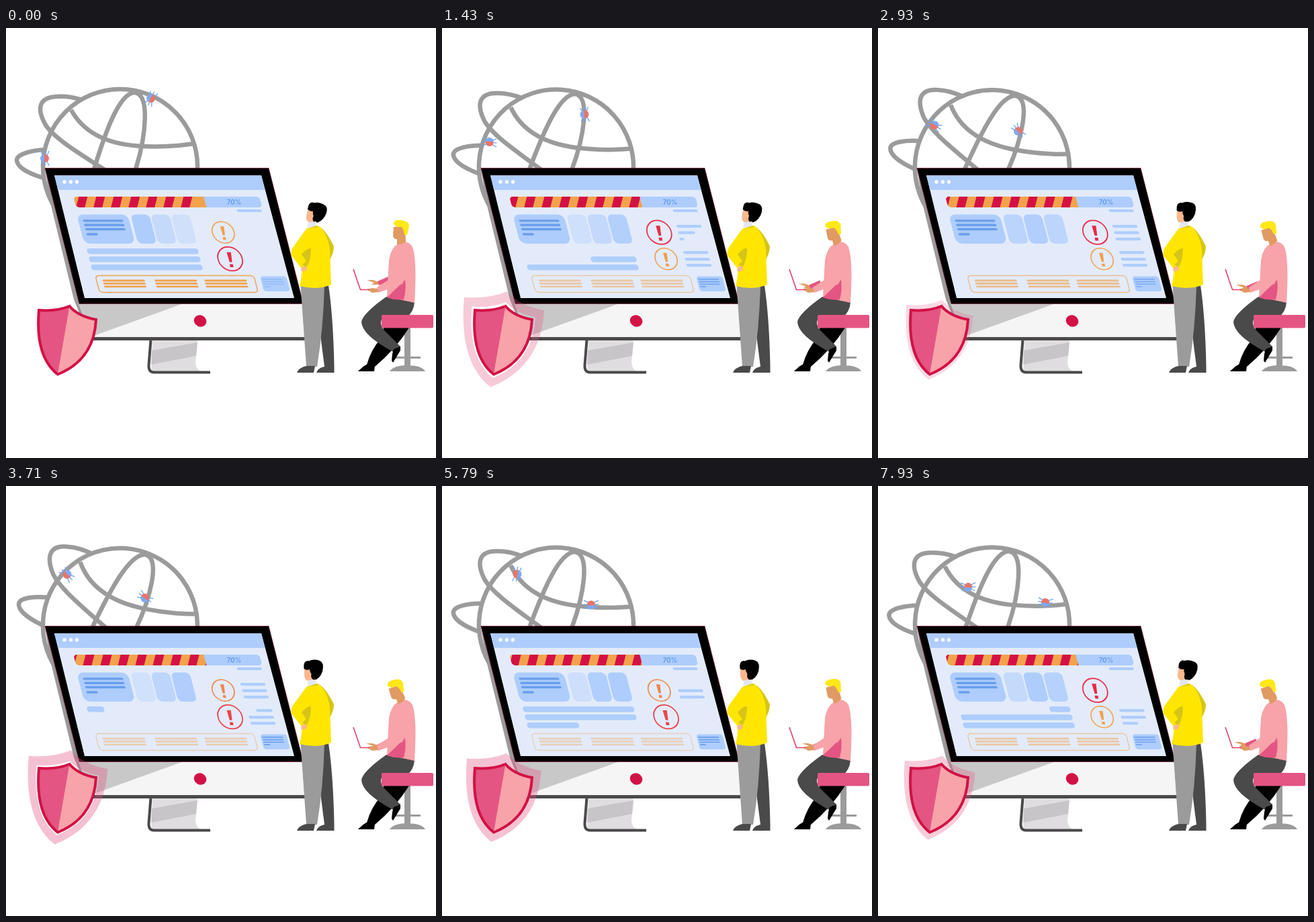
Animation, 640 px wide and 640 px high, one loop 8000 ms. Source, as an HTML page:

```html
<!DOCTYPE html>
<html lang="en">
<head>
<meta charset="utf-8">
<title>Security scan</title>
<style>
html, body { margin: 0; width: 100%; height: 100%; overflow: hidden; background: #fff; }
svg { display: block; width: 100%; height: 100%; }
.line { fill: none; stroke: #9b9b9b; stroke-width: 6.5; }
.grey { fill: #9b9b9b; } .dark { fill: #4a4a4a; }
.yellow { fill: #ffe600; } .mustard { fill: #d6c517; }
.pink { fill: #f7a3a9; } .rose { fill: #e45583; }
.skin { fill: #f9b88e; } .tan { fill: #e09a62; }
.red { fill: #d31145; } .orange { fill: #f2a24c; }
.blue { fill: #aecdfc; } .ink { fill: #6a9eec; }
</style>
</head>
<body>
<svg viewBox="0 0 640 640">
  <defs>
    <clipPath id="track"><rect x="92" y="251" width="277" height="16" rx="5"/></clipPath>
    <clipPath id="filled"><rect x="80" y="251" width="206" height="16"/></clipPath>
    <g id="bug">
      <path d="M-3 4L-6 11M0 5V11M3 4L6 10M-3-4L-6-11M0-5V-11M3-4L6-10" stroke="#6da2f2" stroke-width="1.3"/>
      <circle r="6" fill="#e8756a"/>
      <path d="M1-6A6 6 0 0 1 1 6Z" fill="#7fa9f2"/>
    </g>
    <g id="warning">
      <ellipse rx="16.3" ry="16" fill="none" stroke="currentColor" stroke-width="1.6"/>
      <path d="M-2.8-9H2.8L1.8 4.4H-1.6ZM-2.1 7H2.3V11H-2.1Z" fill="currentColor"/>
    </g>
  </defs>

  <g id="globe" class="line">
    <circle cx="170" cy="206" r="115"/>
    <path d="M122 240L132 207C148 155 168 98 191 96C215 98 208 160 194 207L182 245"/>
    <path d="M180 232L139 206C102 182 74 165 60 146C45 121 48 103 76 102C88 101 100 103 113 107"/>
    <path d="M97 122C115 155 150 172 195 175.500C225 177.500 255 176 280 172"/>
    <path d="M58 181C40 182 16 187 16 197C17 208 35 217 55 223"/>
  </g>
  <use id="bugA" href="#bug"/>
  <use id="bugB" href="#bug"/>

  <path d="M218 464H285L282 498Q283 509 291 511H216Z" fill="#e0dde0"/>
  <path d="M217 480L285 468L283 488L216 501Z" fill="#c8c5c8"/>
  <path d="M215.500 464L212.500 502Q212 512.500 220 512.500H304" fill="none" stroke="#4a4a4a" stroke-width="4"/>
  <path class="grey" d="M58 208L65 256L101 404L125 463H140L109 410Z"/>
  <path d="M108 410H443L450 461H127Z" fill="#f5f5f5"/>
  <path d="M108 410H264L128 459Z" fill="#c8c8c8"/>
  <path class="dark" d="M125 460H450V465H127Z"/>
  <path d="M58 208.500H391L442.500 410.500H109Z" stroke="#8a1034" stroke-width=".6"/>
  <path d="M72 219.500H380L429 402H117Z" fill="#e3ebfa"/>
  <path class="blue" d="M72 219.500H380L385.500 241H78Z"/>
  <g fill="#fff"><circle cx="87" cy="229" r="2.700"/><circle cx="96.500" cy="229" r="2.700"/><circle cx="105.500" cy="229" r="2.700"/></g>
  <ellipse class="red" cx="289" cy="436" rx="9.500" ry="8.500" transform="rotate(25 289 436)"/>

  <g id="screen" transform="matrix(1 0 .26 1 -57 0)">
    <g clip-path="url(#track)">
      <rect class="blue" x="92" y="251" width="277" height="16"/>
      <g clip-path="url(#filled)">
        <rect class="orange" x="80" y="251" width="206" height="16"/>
        <path id="stripes" class="red"/>
      </g>
    </g>
    <g id="columns" class="orange">
      <rect x="94" y="368.500" width="236" height="25" rx="5" fill="none" stroke="#f2a24c" stroke-width="1.500"/>
    </g>
  </g>
  <text x="339.500" y="262.800" text-anchor="middle" font-family="Inter, sans-serif" font-size="9.700" font-weight="600" fill="#5b97ea">70%</text>
  <use id="warnA" href="#warning"/>
  <use id="warnB" href="#warning"/>

  <path id="halo" fill="#e45583" fill-rule="evenodd"/>
  <path id="shield" class="pink"/>
  <path class="rose" d="M94.500 414Q75 423 49 420Q43 489 77 515Z"/>
  <path id="rim" fill="none" stroke="#d31145" stroke-width="4"/>

  <g id="standing">
    <path class="dark" d="M466 386L480 383Q487 430 488.500 503V513H462Q464 506 474 504L467 450Z"/>
    <path class="grey" d="M438.500 384H474Q472 450 463 504H447Z"/>
    <path class="dark" d="M447 503H460L458 513H433Q435 506 447 503Z"/>
    <path class="mustard" d="M465 295Q476 300 488 325Q488 336 479 350Z"/>
    <g id="headA">
      <path class="skin" d="M444 266V282Q445 290 450 290V294L461 291V268Z"/>
      <path d="M443.500 272Q442 259 451 260.500Q457 257 467 260Q474 263 471 276Q467 288 458 289Q453 286 454.500 280Q452 276 452 273Q447 275 443.500 272Z"/>
    </g>
    <path d="M450 289L462 288L461 295L448 297Z" fill="#e4e6f2"/>
    <path class="yellow" d="M447 299L464 294Q478 303 482 330L484 382Q463 391 437 384Q441 368 440 358L425 339Q423 332 428 325Z"/>
    <path class="mustard" d="M440 337Q448 327 454 328Q454 346 447 357L441 352L447 347Z"/>
    <path class="mustard" d="M447 299L463 294L465 296L449 299Z"/>
    <path class="skin" d="M440 356L447 354L448 360L443 363L439 361Z"/>
  </g>

  <g id="sitting">
    <path class="grey" d="M593 446H602V503H593ZM578 489H617V492H578ZM571 511Q577 502 597 502Q619 502 624 511Z"/>
    <path d="M562 446H600Q580 478 549 504L537 501Q543 479 558 462ZM524 511Q530 504 538 500L549 503L548 511Z"/>
    <path class="dark" d="M566 400L608 408Q607 422 597 430L560 432Q555 440 562 449L587 474L578 483Q529 457 529 437Q532 424 566 400Z"/>
    <path d="M577 478L587 474V480L576 498L574 495L575 485Z"/>
    <g id="farHand">
      <path class="tan" d="M537 375L546 375L555 378L554 382L544 382L548 379Z"/>
      <path class="rose" d="M553 377L569 370L571 378L555 383Z"/>
    </g>
    <path class="pink" d="M583 322Q597 313 605 326Q612 346 608 409L567 400L570 345Q574 326 583 322Z"/>
    <path class="rose" d="M594 375L567 401Q580 406 592 404Q596 390 594 375Z"/>
    <path class="pink" d="M574 335L569 375L552 386L554 394L590 381Q600 360 594 340Z"/>
    <path class="tan" d="M537 389L545 387L553 388L554 393L545 394Z"/>
    <path d="M517 359L527.500 389.500H541" fill="none" stroke="#e0406c" stroke-width="1.600"/>
    <rect class="rose" x="559" y="427" width="77" height="19.500" rx="2"/>
    <g id="headB">
      <path class="tan" d="M577 296L576 310Q578 315 582 314V322Q589 323 595 318L594 296Z"/>
      <path d="M577 291Q578 285 587 286Q600 287 600 295L597 308H593Q592 298 588 296Q581 298 577 291Z" fill="#ffe817"/>
    </g>
  </g>
</svg>
<script>
const $ = id => document.getElementById(id);
const clamp = v => Math.min(1, Math.max(0, v));
const mix = (a, b, k) => a + (b - a) * k;

function add(parent, cls, x, y, width, height, rx = height / 2) {
  const r = document.createElementNS('http://www.w3.org/2000/svg', 'rect');
  r.setAttribute('class', cls);
  Object.entries({ x, y, width, height, rx }).forEach(([k, v]) => r.setAttribute(k, v));
  return parent.appendChild(r);
}

// Piecewise linear value from flat [time, value, ...] keys
function keyed(t, keys) {
  let i = 0;
  while (i < keys.length - 4 && t > keys[i + 2]) i += 2;
  return mix(keys[i + 1], keys[i + 3], clamp((t - keys[i]) / (keys[i + 2] - keys[i])));
}

const pulse = (t, peak, low = .35) => low + (1 - low) * (1 + Math.cos((t - peak) / 2.4 * 2 * Math.PI)) / 2;

const screen = $('screen');
add(screen, 'blue', 330, 270, 37, 4);
add(screen, 'blue', 90, 277.5, 76, 43.5, 9);
[60, 60, 60, 17].forEach((w, i) => add(screen, 'ink', 97, [285.2, 291.5, 297.8, 305.3][i], w, 3.4));
const cards = [170, 200, 230].map(x => add(screen, 'blue', x, 277.5, 28, 43.5, 7));
const bars = [328, 340, 352].map(y => add(screen, 'blue', 91, y, 166, 8.4));
const notes = [332, 342, 351, 293, 302.5, 312].map(y => add(screen, 'blue', 329, y, 37.5, 4.2));
for (const x of [103, 180.5, 254.5])
  for (const y of [374.6, 379, 383.5]) add($('columns'), 'orange', x, y, 63, 2.8);
add(screen, 'blue', 339, 369.5, 39, 22.5, 4);
const details = [31, 31, 31, 9].map((w, i) => add(screen, 'ink', 341, 373 + i * 3.7, w, 1.7));

// Grows from the left while entering, empties from the left while leaving
function wipe(rect, x, width, enter, leave) {
  rect.setAttribute('x', x + width * leave);
  rect.setAttribute('width', width * clamp(enter - leave));
}

const shieldPath = s => {
  const p = (x, y) => `${89 + (x - 89) * s} ${468 + (y - 468) * s}`;
  return `M${p(94.5, 414)}Q${p(107, 429)} ${p(134, 434)}Q${p(131, 494)} ${p(77, 515.5)}` +
    `Q${p(43, 489)} ${p(49, 420)}Q${p(75, 422)} ${p(94.5, 414)}Z`;
};
$('shield').setAttribute('d', shieldPath(1));
$('rim').setAttribute('d', shieldPath(1));

const stripes = Array.from({ length: 19 }, (_, i) => `M${100 + 26 * (i - 12)} 251h13l-8.200 16h-13z`);
$('stripes').setAttribute('d', stripes.join(''));

const place = (id, value) => $(id).setAttribute('transform', value);

function warning(id, x, y, colour, size) {
  const [r, g, b] = [[242, 236], [160, 40], [76, 70]].map(c => mix(c[0], c[1], colour));
  $(id).style.color = `rgb(${r},${g},${b})`;
  const s = mix(1, 1.11, size);
  place(id, `matrix(${s} 0 ${.2 * s} ${s} ${x} ${y})`);
}

function draw(now) {
  const t = now % 8000 / 1000, cycle = t % 7.2, beat = t % 2.4;

  place('globe', `rotate(${9 * (1 - Math.abs(cycle - 3.6) / 3.6)} 160 206)`);
  const ax = keyed(t, [0, 58, 4.47, 97.5, 8, 135]), ay = keyed(t, [0, 194, 4.47, 119.3, 8, 150.7]);
  const bx = keyed(t, [0, 216, 4.46, 205, 8, 250]), by = keyed(t, [0, 105, 4.46, 178.5, 8, 173]);
  const aTurn = keyed(t, [0, 180, .79, 265, 2.07, 285, 3.71, 315, 5.79, 365, 8, 452]);
  const bTurn = keyed(t, [0, 205, .79, 185, 2.07, 165, 3.71, 125, 5.79, 90, 6.79, 45, 8, 100]);
  place('bugA', `translate(${ax} ${ay}) rotate(${aTurn})`);
  place('bugB', `translate(${bx} ${by}) rotate(${bTurn})`);

  place('stripes', `translate(${30.8 * t})`);
  [0, .75, 1.12].forEach((peak, i) => cards[i].setAttribute('opacity', pulse(t, peak)));
  $('columns').setAttribute('opacity', pulse(t, 2.28));
  details.forEach(r => r.setAttribute('opacity', pulse(t, 1.1)));

  bars.forEach((r, i) => {
    const back = clamp((cycle - 3.57 - .9 * i) / .9);
    const gone = clamp((cycle - .9 * i) / .9);
    wipe(r, 91, 166, cycle < 3.5 ? 1 : back, cycle < 3.5 ? gone : 0);
  });
  notes.forEach((r, i) => {
    const start = i < 3 ? .225 * i : .9 + .225 * (i - 3);
    wipe(r, 329, 37.5, clamp((cycle - start) / .45), clamp((cycle - 3.55 - .584 * i) / .45));
  });

  const alarm = Math.cos((t - 2.35) / 4.8 * 2 * Math.PI);
  const colour = clamp(.5 + alarm * 1.3), size = clamp(.5 + alarm * 2.5);
  warning('warnA', 323.3, 304.2, colour, size);
  warning('warnB', 333.6, 343.7, 1 - colour, 1 - size);

  const outer = keyed(beat, [0, 1, .79, 1.25, 1.31, 1.38, 2, 1.5, 2.4, 1.53]);
  const inner = keyed(beat, [.95, 1, 1.31, 1.09, 2, 1.22, 2.4, 1.25]);
  $('halo').setAttribute('d', shieldPath(outer) + shieldPath(inner));
  $('halo').setAttribute('opacity', keyed(beat, [0, 0, .76, .31, 1.1, .38, 1.31, .36, 2, .08, 2.2, 0]));

  place('headA', `rotate(${keyed(t, [0, 14, .79, 14, 2.07, 8, 3.4, 0, 6.79, 0, 8, 10])} 456 293)`);
  place('headB', `rotate(${keyed(t, [0, 0, .79, -15, 2.07, -15, 3.71, -21, 5.79, -15, 6.79, -19, 8, -21])} 589 319)`);
  const hx = keyed(t, [0, 0, .79, -5, 2.07, -8, 3.71, -1, 6.79, -1, 8, -7]);
  const hy = keyed(t, [0, 0, .79, 5, 2.07, 6, 3.71, 8, 6.79, 8, 8, 6]);
  place('farHand', `translate(${hx} ${hy})`);

  requestAnimationFrame(draw);
}
requestAnimationFrame(draw);
</script>
</body>
</html>
```
